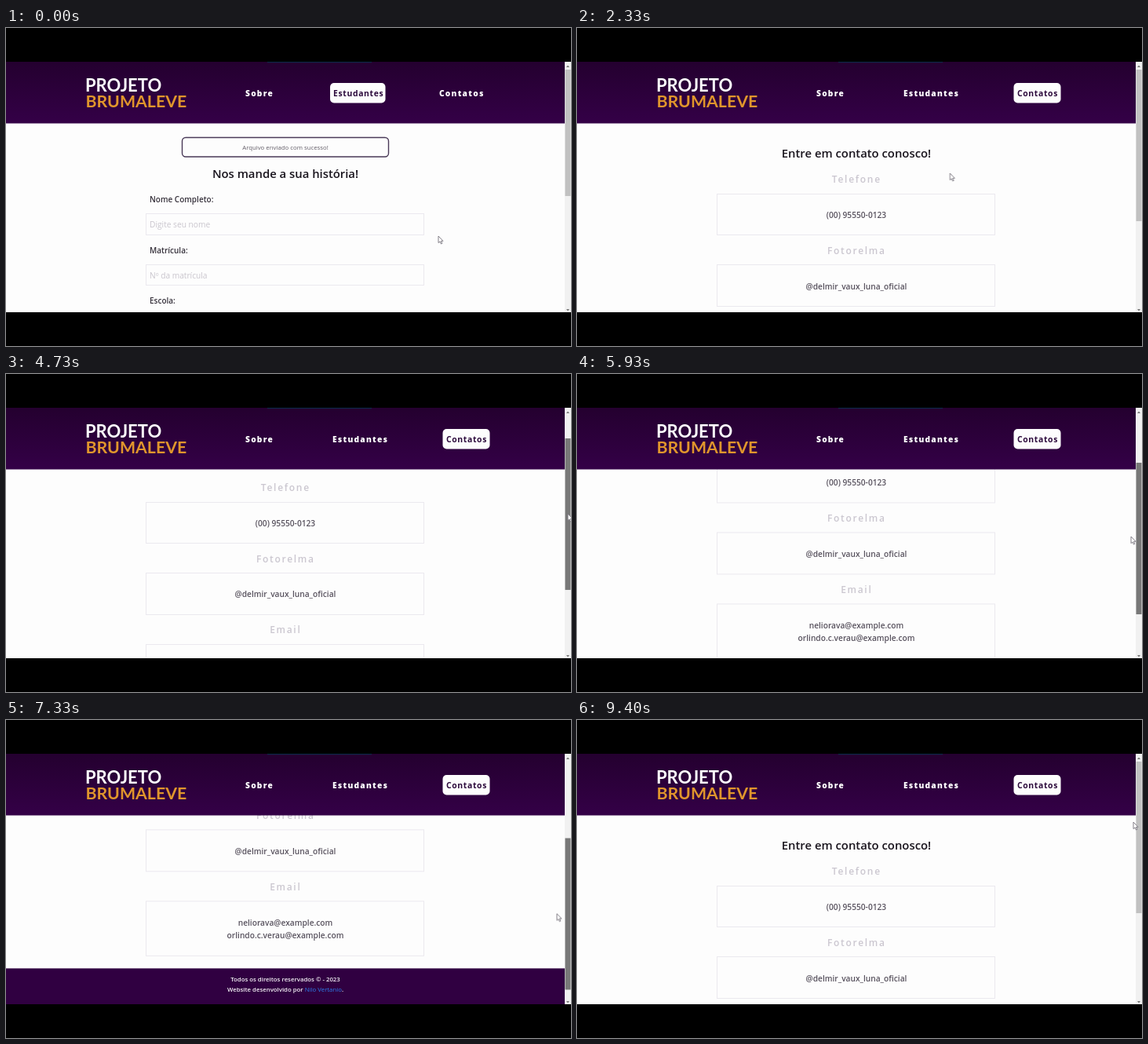
An HTML page that plays this animation: 720 px wide and 405 px high, repeating every 9470 ms.

```html
<!DOCTYPE html>
<html lang="pt-BR">
<head>
<meta charset="utf-8">
<title>Contatos</title>
<style>
@property --scroll { syntax: "<number>"; inherits: true; initial-value: 0; }

html, body { margin: 0; height: 100%; overflow: hidden; background: #000; }
svg { display: block; width: 720px; height: 405px; animation: scroll 9470ms linear infinite; }
text { font: 600 10.2px "Open Sans", "Noto Sans", sans-serif; fill: #58525e; }
.mid { text-anchor: middle; }

.logo { font: 700 22px Lato, sans-serif; fill: #fff; }
.logo.name { font-size: 21.3px; fill: #e0962c; }
.nav text { font-size: 10.2px; font-weight: 800; letter-spacing: 1.25px; fill: #fff; }
.nav .on { font-size: 10.4px; font-weight: 700; letter-spacing: .65px; fill: #2c0a3c; }
.pill { fill: #fdfdfd; }

.title { font-size: 14.85px; fill: #19141d; }
.label { font-size: 10px; fill: #37323c; }
.hint { font-weight: 400; fill: #c9c5cd; }
.note { font-size: 7.8px; font-weight: 400; fill: #625d67; }
.head { font-size: 12px; letter-spacing: 1.7px; fill: #cbc7d0; }
.foot text { font-size: 7.8px; fill: #f6f3f8; }
.foot .link { font-weight: 400; fill: #2d7ff0; }
.box { fill: none; stroke: #ebe9ef; }
.alert { fill: #fdfdfd; stroke: #4a3a58; stroke-width: 1.4; }

.students { animation: leave 9470ms step-end infinite; }
.contacts { animation: enter 9470ms step-end infinite; }
.body { transform: translateY(calc(var(--scroll) * -1px)); }
.thumb { transform: translateY(calc(var(--scroll) * .603px)); animation: drag 9470ms step-end infinite; }
.cursor { animation: move 9470ms linear infinite; }

@keyframes leave { 0% { visibility: visible } 11.93%, 100% { visibility: hidden } }
@keyframes enter { 0% { visibility: hidden } 11.93%, 100% { visibility: visible } }
@keyframes drag { 0% { fill: #c1c1c1 } 36.9% { fill: #787878 } 97.5%, 100% { fill: #c1c1c1 } }
@keyframes scroll {
  0%, 37.3% { --scroll: 0 }
  49.95% { --scroll: 48 }
  62.62% { --scroll: 99.5 }
  72.54% { --scroll: 135.5 }
  79.9%, 82.5% { --scroll: 175 }
  87.33% { --scroll: 159 }
  92% { --scroll: 60 }
  96%, 100% { --scroll: 0 }
}
@keyframes move {
  0%, 1% { transform: translate(551px, 265px) }
  8%, 13% { transform: translate(583px, 84px) }
  24.6% { transform: translate(475px, 185px) }
  35%, 37% { transform: translate(716px, 149px) }
  49.95% { transform: translate(716px, 178px) }
  62.62% { transform: translate(706px, 207px) }
  72.54% { transform: translate(702px, 234px) }
  79.5%, 82% { transform: translate(702px, 252px) }
  87.33% { transform: translate(702px, 237px) }
  96%, 100% { transform: translate(709px, 130px) }
}
</style>
</head>
<body>
<svg viewBox="0 0 720 405">
  <defs>
    <linearGradient id="plum" x2="0" y2="1">
      <stop stop-color="#24002f"/>
      <stop offset="1" stop-color="#340047"/>
    </linearGradient>
    <clipPath id="view"><path d="M0 121H712V362H0z"/></clipPath>
    <clipPath id="screen"><path d="M0 43H720V362H0z"/></clipPath>
  </defs>

  <path fill="#fdfdfd" d="M0 43H720V362H0z"/>

  <g clip-path="url(#view)">
    <g class="students">
      <rect class="alert" x="224.5" y="139.5" width="263" height="24.5" rx="4.5"/>
      <text class="note mid" x="356" y="154.5">Arquivo enviado com sucesso!</text>
      <text class="title mid" x="356" y="190.5">Nos mande a sua história!</text>
      <text class="label" x="183" y="222">Nome Completo:</text>
      <rect class="box" x="178.5" y="236.5" width="354" height="27"/>
      <text class="hint" x="183" y="254">Digite seu nome</text>
      <text class="label" x="183" y="286.5">Matrícula:</text>
      <rect class="box" x="178.5" y="301.5" width="354" height="26"/>
      <text class="hint" x="183" y="318.5">Nº da matrícula</text>
      <text class="label" x="183" y="351">Escola:</text>
    </g>

    <g class="contacts">
      <g class="body">
        <text class="title mid" x="356" y="165">Entre em contato conosco!</text>
        <text class="head mid" x="356.3" y="197">Telefone</text>
        <rect class="box" x="178.5" y="211.5" width="354" height="52"/>
        <text class="mid" x="356" y="242">(00) 95550-0123</text>
        <text class="head mid" x="356.3" y="288">Fotorelma</text>
        <rect class="box" x="178.5" y="301.5" width="354" height="53"/>
        <text class="mid" x="356" y="332.5">@delmir_vaux_luna_oficial</text>
        <text class="head mid" x="356.3" y="378.5">Email</text>
        <rect class="box" x="178.5" y="392.5" width="354" height="69.5"/>
        <text class="mid" x="356" y="423.5">neliorava@example.com</text>
        <text class="mid" x="356" y="439.5">orlindo.c.verau@example.com</text>
        <g class="foot">
          <rect y="478" width="712" height="61" fill="#300041"/>
          <text class="mid" x="356" y="495">Todos os direitos reservados © - 2023</text>
          <text class="mid" x="356" y="508">Website desenvolvido por <tspan class="link">Nilo Vertanio</tspan>.</text>
        </g>
      </g>
    </g>
  </g>

  <path fill="url(#plum)" d="M0 43H712V121.5H0z"/>
  <path fill="#0c2c4c" d="M333 43H466V44H333z"/>
  <text class="logo" x="101" y="80.5">PROJETO</text>
  <text class="logo name" x="101.5" y="101">BRUMALEVE</text>

  <g class="nav">
    <text x="305" y="87">Sobre</text>
    <g class="students">
      <rect class="pill" x="413" y="70" width="70.5" height="25.5" rx="5"/>
      <text class="on" x="417" y="87">Estudantes</text>
      <text x="552" y="87">Contatos</text>
    </g>
    <g class="contacts">
      <text x="416" y="87">Estudantes</text>
      <rect class="pill" x="556.5" y="70" width="60" height="25.5" rx="5"/>
      <text class="on" x="561" y="87">Contatos</text>
    </g>
  </g>

  <path fill="#f1f1f1" d="M712 43H720V362H712z"/>
  <path fill="#777" d="M714 50l2-2.5 2 2.5zM714 358l2 2.5 2-2.5z"/>
  <g class="thumb">
    <rect class="students" x="712.5" y="53" width="7" height="161"/>
    <rect class="contacts" x="712.5" y="53" width="7" height="193"/>
  </g>

  <g clip-path="url(#screen)">
    <path class="cursor" fill="#fff" stroke="#77737c" stroke-width=".9" stroke-linejoin="round"
      d="M0 0V8.6L2 6.9 3.4 10 4.8 9.3 3.4 6.3H6z"/>
  </g>
</svg>
</body>
</html>
```
